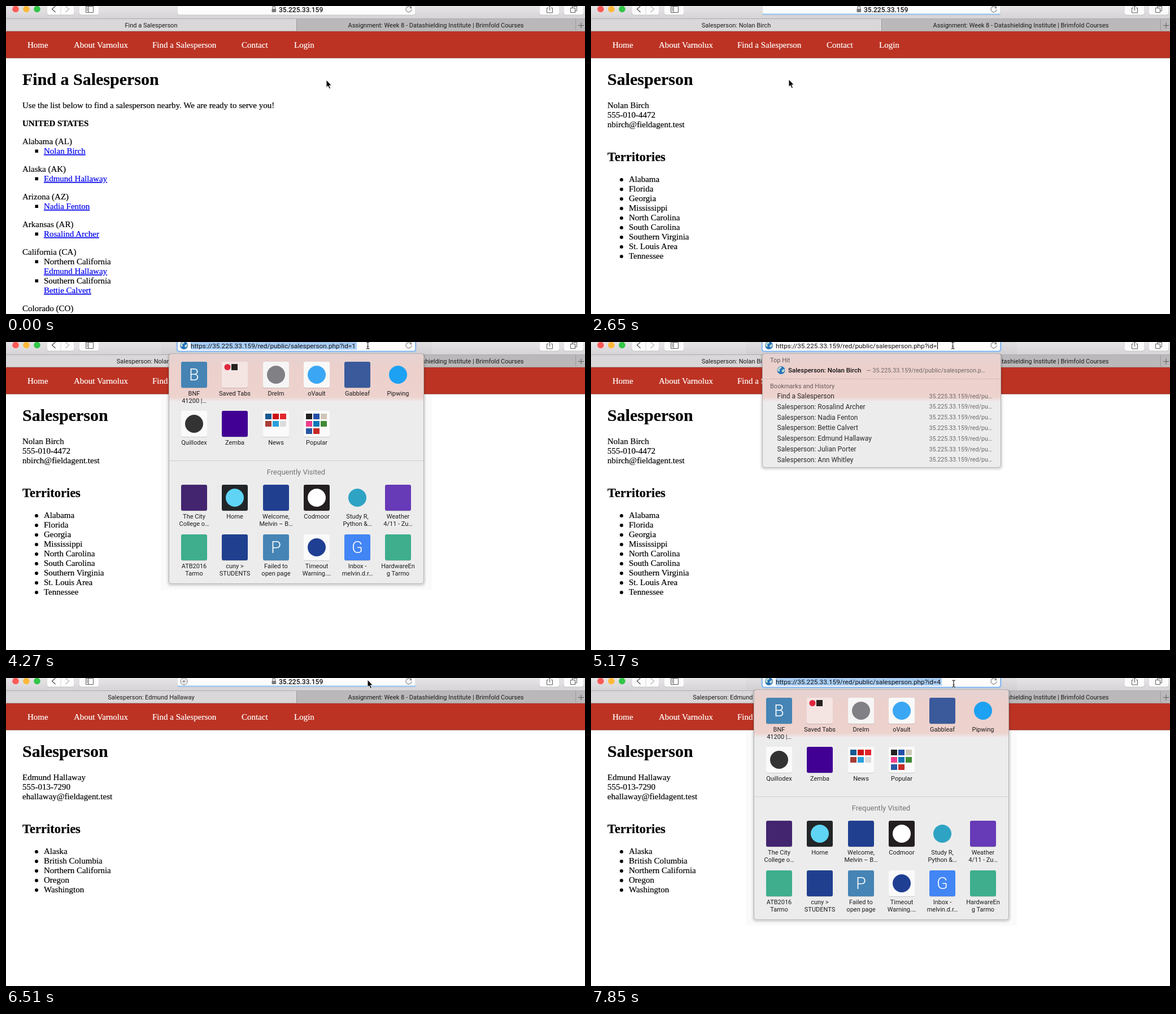
Recreate the animation shown at these times as an HTML page. Size 1025x546 px, loop 8 s.

```html
<!DOCTYPE html>
<html lang="en">
<head>
<meta charset="utf-8">
<title>Find a Salesperson</title>
<style>
html, body { margin: 0; width: 100%; height: 100%; overflow: hidden; background: #fff; }
svg { display: block; width: 100vw; height: 100vh; }
text { font: 11px Roboto, "Open Sans", sans-serif; fill: #1c1c1c; white-space: pre; }
.serif { font: 15px "Liberation Serif", "Times New Roman", serif; fill: #000; stroke: #000; stroke-width: .2px; }
.nav { fill: #fff; stroke: #fff; }
.link { fill: #00e; stroke: #00e; text-decoration: underline; }
.bold { font-weight: 700; }
.h1 { font-size: 30px; font-weight: 700; }
.h2 { font-size: 22.5px; font-weight: 700; }
.mid { text-anchor: middle; }
.end { text-anchor: end; }
.host { font-size: 12px; font-weight: 500; fill: #111; }
.url { font-size: 11.8px; fill: #111; }
.row { font-size: 12px; fill: #2c2a2a; }
.hit { font-size: 11.5px; font-weight: 500; fill: #111; }
.path { font-size: 10.7px; fill: #6e6868; }
.head { fill: #66595a; }
.visited { font-size: 13px; fill: #747474; }
.letter { font-size: 29px; font-weight: 300; fill: #fff; }

/* 8 s loop: 1 % = 80 ms */
.list, .first, .second, .plus, .edit, .sel, .u1, .u0, .u4, .caret, .grid, .hits,
.share, .bar, .cursor, .arrow, .hand, .beam { animation: 8s step-end infinite; }
.first, .second, .plus, .edit, .sel, .u1, .u0, .u4, .caret, .grid, .hits, .hand, .beam { opacity: 0; }
.list { animation-name: list; }
.first { animation-name: first; }
.second { animation-name: second; }
.plus { animation-name: plus; }
.edit { animation-name: edit; }
.sel { animation-name: sel; }
.u1 { animation-name: u1; }
.u0 { animation-name: u0; }
.u4 { animation-name: u4; }
.caret { animation-name: caret; }
.grid { animation-name: grid; }
.hits { animation-name: hits; }
.share { animation-name: share; }
.bar { animation-name: bar; transform-origin: 304px 0; transform: scaleX(0); }
.cursor { animation-name: cursor; }
.arrow { animation-name: arrow; }
.hand { animation-name: hand; }
.beam { animation-name: beam; }

@keyframes list { 29.5% { opacity: 0 } }
@keyframes first { 29.5% { opacity: 1 } 77.625% { opacity: 0 } }
@keyframes second { 77.625% { opacity: 1 } }
@keyframes plus { 5.625%, 38.625%, 74% { opacity: 1 } 16.5%, 44.125%, 92.5% { opacity: 0 } }
@keyframes edit { 47.75%, 92.5% { opacity: 1 } 72.125% { opacity: 0 } }
@keyframes sel { 47.75%, 92.5% { opacity: 1 } 62.75% { opacity: 0 } }
@keyframes u1 { 47.75% { opacity: 1 } 64.625% { opacity: 0 } }
@keyframes u0 { 64.625% { opacity: 1 } 70.25% { opacity: 0 } }
@keyframes u4 { 70.25%, 92.5% { opacity: 1 } 72.125% { opacity: 0 } }
@keyframes caret {
  62.75%, 70.25% { opacity: 1; transform: translateX(7px) }
  64.625% { opacity: 1; transform: none }
  72.125% { opacity: 0 }
}
@keyframes grid { 49.625%, 94.375% { opacity: 1 } 62.75% { opacity: 0 } }
@keyframes hits { 64.625% { opacity: 1 } 72.125% { opacity: 0 } }
@keyframes share { 27.625%, 72.125% { opacity: .35 } 31.25%, 79.5% { opacity: 1 } }
@keyframes bar {
  27.625%, 72.125% { transform: scaleX(.1) }
  29.5%, 75.75% { transform: scaleX(.5) }
  31.25%, 77.625% { transform: scaleX(.85) }
  33.125%, 79.5% { transform: none }
  35%, 83.125% { transform: scaleX(0) }
}
@keyframes cursor {
  0% { transform: translate(567px, 131px) }
  1.875% { transform: translate(576px, 100px) }
  3.75% { transform: translate(594px, 40px) }
  5.625% { transform: translate(608px, 3px) }
  7.375% { transform: translate(602px, 5px) }
  9.25% { transform: translate(560px, 30px) }
  11.125% { transform: translate(450px, 90px) }
  12.875% { transform: translate(320px, 150px) }
  14.75% { transform: translate(217px, 200px) }
  16.5% { transform: translate(152px, 238px) }
  18.375% { transform: translate(122px, 255px) }
  20.25% { transform: translate(137px, 248.5px) }
  29.5% { transform: translate(152px, 238px) }
  31.25% { transform: translate(230px, 190px) }
  33.125% { transform: translate(350px, 130px) }
  35% { transform: translate(480px, 70px) }
  36.75% { transform: translate(570px, 30px) }
  38.625% { transform: translate(610px, 8px) }
  40.375% { transform: translate(614px, 4px) }
  47.75% { transform: translate(628px, 5px) }
  49.625% { transform: translate(640.5px, 6px) }
  74% { transform: translate(640px, 3px) }
  85% { transform: translate(641px, 9px) }
  86.875% { transform: translate(642px, 10px) }
}
@keyframes arrow { 18.375%, 47.75%, 88.75% { opacity: 0 } 29.5%, 74% { opacity: 1 } }
@keyframes hand { 18.375% { opacity: 1 } 29.5% { opacity: 0 } }
@keyframes beam { 47.75%, 88.75% { opacity: 1 } 74% { opacity: 0 } }
</style>
</head>
<body>
<svg id="stage" viewBox="0 0 1025 546" preserveAspectRatio="none"></svg>
<script>
const people = {
  a: 'Nolan Birch', b: 'Edmund Hallaway', c: 'Nadia Fenton', d: 'Rosalind Archer',
  e: 'Bettie Calvert', f: 'Julian Porter', g: 'Ann Whitley'
};
const address = 'https://35.225.33.159/red/public/salesperson.php?id=';

const esc = s => s.replace(/&/g, '&amp;').replace(/</g, '&lt;').replace(/>/g, '&gt;');
const text = (x, y, s, cls = '') => `<text x="${x}" y="${y}" class="${cls}">${esc(s)}</text>`;
const serif = (x, y, s, cls = '') => text(x, y, s, 'serif ' + cls);
const rect = (x, y, w, h, fill, more = '') =>
  `<rect x="${x}" y="${y}" width="${w}" height="${h}" fill="${fill}" ${more}/>`;
const dot = (x, y, r, fill, more = '') => `<circle cx="${x}" cy="${y}" r="${r}" fill="${fill}" ${more}/>`;
const line = (d, color, w = 1) => `<path d="${d}" fill="none" stroke="${color}" stroke-width="${w}"/>`;
const group = (cls, ...parts) => `<g class="${cls}">${parts.join('')}</g>`;
const button = (x, w) => rect(x, -8, w, 24.5, '#c3c1c3', 'rx="4"') + rect(x + .5, -8, w - 1, 23.5, '#fcfcfc', 'rx="4"');

const globe = (x, y) => dot(x, y, 7, '#2673b8') +
  `<path d="M${x - 5} ${y - 4}q3 -3 6 -2l-1 3l-3 1l1 3l-2 2q-4 -3 -1 -7M${x + 2} ${y - 1}l4 -1q1 4 -3 6l-2 -2z" fill="#b9d9d3"/>`;

const defs = `<defs>
  <linearGradient id="tool" x2="0" y2="1"><stop stop-color="#e6e4e6"/><stop offset="1" stop-color="#d5d3d5"/></linearGradient>
  <linearGradient id="glass" gradientUnits="userSpaceOnUse" x1="0" x2="0" y1="20" y2="106">
    <stop stop-color="#e4d3d2"/><stop offset=".3" stop-color="#ecd0cc"/>
    <stop offset=".9" stop-color="#edd2ce"/><stop offset="1" stop-color="#ececec"/></linearGradient>
</defs>`;

function toolbar() {
  return rect(0, 0, 1025, 23, 'url(#tool)') + rect(0, 22, 1025, 1, '#aeacae') +
    ['#fc5b57', '#fdb93a', '#32c748'].map((c, i) => dot(17 + 19 * i, 5.5, 5.8, c)).join('') +
    button(72, 49) + rect(96.5, 0, 1, 16, '#d5d5d5') +
    line('M87.5 0L81.5 5.5L87.5 11', '#5c5c5c', 1.4) + line('M105.5 0L111.5 5.5L105.5 11', '#bcbcbc', 1.4) +
    button(129, 36) + line('M141.5 .5H154.5V11.5H141.5ZM146 0V11.5M143 3H145M143 5.5H145M143 8H145', '#5c5c5c') +
    button(303, 422) + line('M472 5V3a2.3 2.3 0 0 1 4.6 0V5', '#7a7a7a', 1.3) +
    rect(470.5, 5, 7.6, 6, '#7a7a7a', 'rx="1"') + text(483, 10.5, '35.225.33.159', 'host') +
    group('plus', line('M311.5 6H318.5M315 2.5V9.5', '#6e6e6e'),
      dot(315, 6, 6, 'none', 'stroke="#6e6e6e"')) +
    `<rect class="bar" x="304" y="13.5" width="421" height="2" fill="#8fc3f5"/>` +
    button(944, 36) +
    group('share', line('M960 3.5H957.5V12H967.5V3.5H965M962.5 8V-1M960 1.5L962.5 -1L965 1.5', '#5c5c5c')) +
    button(987, 36) + line('M1002.5 3V.5H1010.5V8.5H1007.5M999.5 3.5H1007.5V11.5H999.5Z', '#5c5c5c');
}

function tabs() {
  const title = (cls, s) => text(257, 38, s, 'mid ' + cls);
  return rect(0, 23, 1025, 22, '#d9d7d9') + rect(514, 23, 511, 22, '#bab8ba') +
    rect(514, 23, 1, 22, '#9c9a9c') + rect(1008, 23, 1, 22, '#9c9a9c') + rect(0, 44, 1025, 1, '#a5a0a0') +
    line('M1013 34.5H1023M1018 29.5V39.5', '#5c5c5c') +
    title('list', 'Find a Salesperson') + title('first', 'Salesperson: ' + people.a) +
    title('second', 'Salesperson: ' + people.b) +
    text(761, 38, 'Assignment: Week 8 - Datashielding Institute | Brimfold Courses', 'mid');
}

function nav() {
  const items = [[38, 'Home'], [120, 'About Varnolux'], [259, 'Find a Salesperson'], [417, 'Contact'], [510, 'Login']];
  return rect(0, 45, 1025, 47, '#bc3323') + rect(0, 91.5, 1025, 1, '#8c2b20') +
    items.map(([x, s]) => serif(x, 74, s, 'nav')).join('');
}

function listPage() {
  const states = [['Alabama (AL)', 'a'], ['Alaska (AK)', 'b'], ['Arizona (AZ)', 'c'], ['Arkansas (AR)', 'd']];
  const square = y => rect(51.5, y - 7.5, 5.5, 5.5, '#000');
  const link = (y, k) => serif(67, y, people[k], 'link');
  return group('list',
    serif(29, 139.5, 'Find a Salesperson', 'h1'),
    serif(29, 181, 'Use the list below to find a salesperson nearby. We are ready to serve you!'),
    serif(29, 213, 'UNITED STATES', 'bold'),
    ...states.map(([s, k], i) => {
      const y = 245 + 49 * i;
      return serif(29, y, s) + square(y + 17) + link(y + 17, k);
    }),
    serif(29, 441, 'California (CA)'),
    square(458), serif(67, 458, 'Northern California'), link(475, 'b'),
    square(492), serif(67, 492, 'Southern California'), link(509, 'e'),
    serif(29, 541, 'Colorado (CO)'));
}

function personPage(cls, contact, places) {
  return group(cls,
    serif(29, 139.5, 'Salesperson', 'h1'),
    ...contact.map((s, i) => serif(29, 181 + 17 * i, s)),
    serif(29, 275, 'Territories', 'h2'),
    ...places.map((s, i) => dot(54, 308 + 17 * i, 3, '#000') + serif(67, 312 + 17 * i, s)));
}

function editField() {
  return group('edit',
    rect(274, 0, 480, 22, '#000', 'opacity=".02"'),
    rect(301.5, -8, 425, 26, '#8fbcf0', 'rx="5"'),
    rect(304, -8, 420, 23.5, '#fdfdfd', 'rx="3"'),
    globe(315, 6),
    `<rect class="sel" x="327" y="0" width="294" height="13.5" fill="#a8cdf4"/>`,
    text(327, 10.5, address + '1', 'url u1'), text(327, 10.5, address, 'url u0'), text(327, 10.5, address + '4', 'url u4'),
    `<rect class="caret" x="613" y="0" width="1" height="13" fill="#000"/>`);
}

const reload = line('M716.5 2.2A5 5 0 1 0 718 6', '#858585', 1.2) + `<path d="M714 3.8L718.4 4.4L717.6 0Z" fill="#858585"/>`;

const panel = (x, y, w, h) =>
  rect(x - 4, y, w + 8, h + 5, '#000', 'rx="8" opacity=".05"') +
  rect(x - 1.5, y, w + 3, h + 2.5, '#000', 'rx="6" opacity=".08"') +
  rect(x + .5, y + .5, w - 1, h - 1, 'url(#glass)', 'rx="5" stroke="#b4b0b0"');

// tile: [background, mark colour or kind, label lines, letter]
const tiles = [
  [35, [
    ['#4584b5', '', 'BNF\n41200 |…', 'B'], ['#f4e5e3', 'tabs', 'Saved Tabs'], ['#f6f5f5', '#808085', 'Drelm'],
    ['#f9f9f9', '#3ba7f4', 'oVault'], ['#3a5a9c', '', 'Gabbleaf'], ['', '#1da1f2', 'Pipwing']]],
  [122, [
    ['#fafafa', '#333', 'Quillodex'], ['#410093', '', 'Zemba'], ['#fafafa', 'news', 'News'], ['#fafafa', 'popular', 'Popular']]],
  [253, [
    ['#43256f', '', 'The City\nCollege o…'], ['#222527', '#5fd4f4', 'Home'], ['#203f8f', '', 'Welcome,\nMelvin – B…'],
    ['#231e20', '#fff', 'Codmoor'], ['', '#2ea3c4', 'Study R,\nPython &…'], ['#673ab7', '', 'Weather\n4/11 - Zu…']]],
  [341, [
    ['#3eae8d', '', 'ATB2016\nTarmo'], ['#203f8f', '', 'cuny >\nSTUDENTS'], ['#4584b5', '', 'Failed to\nopen page', 'P'],
    ['#fafafa', '#1f3f92', 'Timeout\nWarning.…'], ['#4285f4', '', 'Inbox -\nmelvin.d.r…', 'G'], ['#3eae8d', '', 'HardwareEn\ng Tarmo']]]
];
const minis = {
  news: ['#17598f', '#cc1212', '#e3252b', '#a83d35', '#2a9fdd', '#dcdcdc'],
  popular: ['#222', '#2350a8', '#cfc8b8', '#ef3d8c', '#0a78b5', '#3f8b35', '#2857a5', '#c52a26']
};

function mark(kind, x, y) {
  if (kind === 'tabs') return dot(x - 13, y + 9.5, 5.5, '#e0263c') + rect(x - 6, y + 4, 11, 11, '#26221f');
  if (minis[kind]) {
    return minis[kind].map((c, i) => rect(x - 19 + 13 * (i % 3), y + 5 + 13 * Math.floor(i / 3), 11, 10, c)).join('');
  }
  return dot(x, y + 23, 16, kind);
}

function tile([bg, kind, label, letter], x, y) {
  return (bg ? rect(x - 23, y + 1, 46, 46, '#000', 'rx="3" opacity=".15"') + rect(x - 23, y, 46, 46, bg, 'rx="3"') : '') +
    (kind ? mark(kind, x, y) : '') +
    (letter ? text(x, y + 33, letter, 'mid letter') : '') +
    label.split('\n').map((s, i) => text(x, y + 60.3 + 13 * i, s, 'mid')).join('');
}

function gridPanel() {
  return group('grid',
    rect(274, 93, 480, 346, '#000', 'opacity=".02"'),
    panel(288, 20, 452, 409),
    rect(289, 210, 450, 1, '#cfcfcf'),
    text(513.5, 235, 'Frequently Visited', 'mid visited'),
    ...tiles.flatMap(([y, row]) => row.map((t, i) => tile(t, Math.round(333 + 72.25 * i), y))));
}

function hitsPanel() {
  const rows = ['Find a Salesperson', ...[...'dcebfg'].map(k => 'Salesperson: ' + people[k])];
  return group('hits',
    panel(303, 20, 423, 203),
    text(317, 36, 'Top Hit', 'head'),
    globe(336.5, 50),
    text(349, 53.5, 'Salesperson: ' + people.a, 'hit'),
    text(698, 53.5, '— 35.225.33.159/red/public/salesperson.p…', 'path end'),
    rect(304, 65, 421, 1, '#d3bab7'),
    text(317, 82, 'Bookmarks and History', 'head'),
    ...rows.map((s, i) => {
      const y = 100 + 18.8 * i;
      return text(329.5, y, s, 'row') + text(710, y - .4, '35.225.33.159/red/pu…', 'path end');
    }));
}

const beamPath = 'M-3 -6Q0 -6 0 -4.5Q0 -6 3 -6M0 -5V5M-3 6Q0 6 0 4.5Q0 6 3 6M-1.5 2H1.5';
const pointer = group('cursor',
  `<path class="arrow" d="M0 0V13.4L3 10.7L5.2 15.8L7.5 14.8L5.4 9.9H9.4Z" fill="#000" stroke="#fff" stroke-width="1"/>`,
  `<path class="hand" d="M3.4 8L1.6 2.4Q1.5 .8 2.8 .6Q4 .6 4.5 2L6 5.8Q7.2 4.8 8.2 6Q9.5 5.4 10.2 6.6Q12 6.2 12.3 8.2Q12.6 11.8 11 13.5V15.5H5.2V14Q2.8 11.6 .8 9Q.4 7.5 2 7.3ZM6.8 9.5V12.5M8.6 9.5V12.5M10.3 9.5V12.5" fill="#fff" stroke="#000" stroke-width="1"/>`,
  group('beam', line(beamPath, '#fff', 2.4), line(beamPath, '#111', 1.1)));

document.getElementById('stage').innerHTML = [
  defs, toolbar(), tabs(), nav(), listPage(),
  personPage('first', [people.a, '555-010-4472', 'nbirch@fieldagent.test'],
    ['Alabama', 'Florida', 'Georgia', 'Mississippi', 'North Carolina', 'South Carolina',
      'Southern Virginia', 'St. Louis Area', 'Tennessee']),
  personPage('second', [people.b, '555-013-7290', 'ehallaway@fieldagent.test'],
    ['Alaska', 'British Columbia', 'Northern California', 'Oregon', 'Washington']),
  editField(), reload, gridPanel(), hitsPanel(), pointer
].join('');
</script>
</body>
</html>
```
